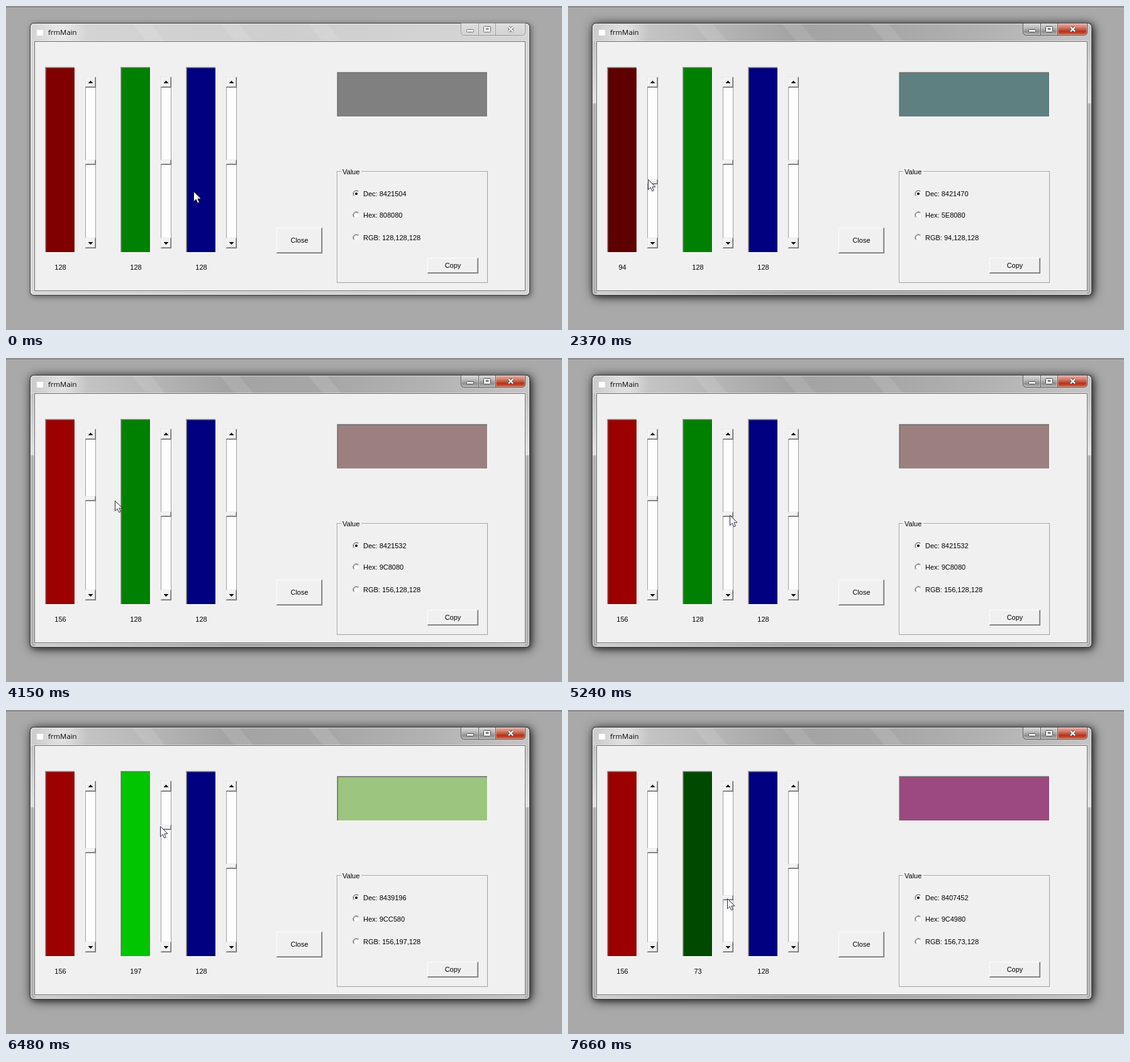
Recreate the animation shown at these times as an HTML page with a canvas. Size 884 by 516 pixels, loop 8 s.

```html
<!DOCTYPE html>
<html lang="en">
<head>
<meta charset="utf-8">
<title>Colour mixer</title>
<style>
html, body { margin: 0; width: 100%; height: 100%; overflow: hidden; background: #a9a9a9; }
canvas { display: block; }
</style>
</head>
<body>
<canvas id="stage" width="884" height="516"></canvas>
<script>
const ctx = document.getElementById('stage').getContext('2d');
const LOOP = 8000;
const STEP = 137;
const ACTIVATE = 1090;
const UI = '11px "Liberation Sans", Arial, sans-serif';
const FACE = '#f0f0f0';

// Each pose lists only what changes; the rest carries over
const poses = [
  { t: 0, x: 298, y: 295, r: 128, g: 128, b: 128 },
  { t: 140 },
  { t: 1280, x: 131, y: 247 },
  { t: 2370, x: 127, y: 276, r: 94 },
  { t: 3150, x: 133, y: 181, r: 201 },
  { t: 3450, x: 131, y: 209, r: 169 },
  { t: 3840, x: 128, y: 222, r: 156 },
  { t: 4010 },
  { t: 4560, x: 308, y: 242 },
  { t: 4970, x: 257, y: 250 },
  { t: 5100 },
  { t: 5240 },
  { t: 6480, x: 245, y: 185, g: 197 },
  { t: 7300, x: 250, y: 276, g: 96 },
  { t: 7660, x: 253, y: 300, g: 73 }
];
poses.forEach((p, i) => { poses[i] = { ...poses[i - 1], ...p }; });

// The picture refreshes in steps counted from the latest pose
function stateAt(time) {
  const i = poses.findLastIndex(p => p.t <= time);
  const a = poses[i], b = poses[i + 1] || a;
  const t = a.t + Math.floor((time - a.t) / STEP) * STEP;
  const f = b === a ? 0 : (t - a.t) / (b.t - a.t);
  const s = { active: t >= ACTIVATE };
  for (const k of 'xyrgb') s[k] = Math.round(a[k] + (b[k] - a[k]) * f);
  return s;
}

function rect(x, y, w, h, color) {
  ctx.fillStyle = color;
  ctx.fillRect(x, y, w, h);
}

function frame(x, y, w, h, light, dark) {
  rect(x, y, w, 1, light);
  rect(x, y, 1, h, light);
  rect(x, y + h - 1, w, 1, dark);
  rect(x + w - 1, y, 1, h, dark);
}

function text(str, x, y, align = 'left', font = UI) {
  ctx.font = font;
  ctx.textAlign = align;
  ctx.fillStyle = '#000';
  ctx.fillText(str, x, y);
}

function fill(color) {
  ctx.fillStyle = color;
  ctx.fill();
}

function stroke(color, width = 1) {
  ctx.lineWidth = width;
  ctx.strokeStyle = color;
  ctx.stroke();
}

function shape(points, color) {
  ctx.beginPath();
  points.forEach(([x, y]) => ctx.lineTo(x, y));
  ctx.closePath();
  fill(color);
}

function gradient(x0, y0, x1, y1, ...colors) {
  const g = ctx.createLinearGradient(x0, y0, x1, y1);
  colors.forEach((c, i) => g.addColorStop(i / (colors.length - 1), c));
  return g;
}

function round(x, y, w, h, r) {
  ctx.beginPath();
  ctx.roundRect(x, y, w, h, r);
}

function raised(x, y, w, h) {
  rect(x, y, w, h, FACE);
  frame(x, y, w, h, '#e3e3e3', '#696969');
  frame(x + 1, y + 1, w - 2, h - 2, '#fff', '#a0a0a0');
}

function sunken(x, y, w, h, color) {
  rect(x, y, w, h, color);
  frame(x, y, w, h, '#a0a0a0', '#fff');
  rect(x + 1, y + 1, w - 2, 1, '#696969');
  rect(x + 1, y + 1, 1, h - 2, '#696969');
}

function button(label, x, y, w, h) {
  rect(x, y, w, h, FACE);
  frame(x, y, w, h, '#fff', '#696969');
  frame(x + 1, y + 1, w - 2, h - 2, FACE, '#a0a0a0');
  text(label, x + w / 2, Math.floor(y + h / 2) + 4, 'center');
}

function captionButton(x, w, corners, face, edge) {
  round(x + 0.5, 27.5, w, 19, corners);
  fill(face);
  stroke(edge);
  round(x + 1.5, 28.5, w - 2, 17, corners);
  stroke('rgba(255,255,255,.4)');
}

function captionButtons(active) {
  const down = (...colors) => gradient(0, 28, 0, 47, ...colors);
  const gray = active ? down('#d6d6d6', '#bdbdbd', '#8f8f8f', '#b9b9b9') : down('#dedede', '#d2d2d2');
  const red = active ? down('#e5b0a4', '#d07b69', '#b8301a', '#d46c4c') : gray;
  const edge = active ? '#555' : '#929292';
  const ink = active ? '#4c4c4c' : '#727272';
  captionButton(723, 28, [0, 0, 0, 5], gray, edge);
  captionButton(751, 27, 0, gray, edge);
  captionButton(778, 47, [0, 0, 5, 0], red, edge);

  round(732.5, 37.5, 11, 4, 1);
  fill('#f6f6f6');
  stroke(ink);
  round(759.5, 32.5, 11, 9, 1);
  fill('#f6f6f6');
  stroke(ink);
  ctx.strokeRect(763.5, 35.5, 3, 2);
  ctx.beginPath();
  for (const d of [-3.5, 3.5]) {
    ctx.moveTo(802.5 - d, 33.5);
    ctx.lineTo(802.5 + d, 40.5);
  }
  stroke(ink, 4.4);
  stroke('#fff', 2.4);
}

function shadow(blur, alpha) {
  ctx.save();
  ctx.shadowColor = `rgba(0,0,0,${alpha})`;
  ctx.shadowBlur = blur;
  ctx.shadowOffsetX = ctx.shadowOffsetY = 2;
  round(38, 27, 795, 434, 6);
  fill('#3c3c3c');
  ctx.restore();
}

function windowFrame(active) {
  shadow(active ? 18 : 10, active ? 0.7 : 0.5);
  if (active) shadow(8, 0.45);

  ctx.save();
  round(39, 28, 793, 432, 5);
  ctx.clip();
  const tones = active ? ['#cecece', '#bbb', '#a3a3a3', '#a7a7a7', '#b2b2b2', '#c6c6c6'] : ['#d6d6d6', '#cecece', '#d6d6d6'];
  rect(39, 28, 793, 432, gradient(39, 0, 832, 0, ...tones));
  for (let x = 200; x < 500; x += 140)
    shape([[x, 28], [x + 30, 28], [x + 54, 57], [x + 24, 57]], 'rgba(255,255,255,.1)');
  for (const x of active ? [39, 825] : []) {
    rect(x, 57, 7, 98, gradient(0, 57, 0, 155, '#c2c2c2', '#e2e2e2'));
    rect(x, 155, 7, 305, '#b0b0b0');
  }
  const glow = ctx.createRadialGradient(88, 42, 8, 88, 42, 42);
  glow.addColorStop(0, 'rgba(255,255,255,.45)');
  glow.addColorStop(1, 'rgba(255,255,255,0)');
  rect(46, 29, 90, 27, glow);
  ctx.restore();

  round(39.5, 28.5, 792, 431, 5);
  stroke('rgba(255,255,255,.65)');
  rect(44, 55, 783, 400, 'rgba(255,255,255,.5)');
  rect(45, 56, 781, 398, '#686868');
  rect(46, 57, 779, 396, FACE);
  rect(49, 38, 10, 9, '#fff');
  text('frmMain', 67, 46, 'left', '11.4px "Open Sans", "Noto Sans", sans-serif');
  captionButtons(active);
}

function scrollbar(x, value) {
  rect(x, 113, 17, 273, '#fdfdfd');
  frame(x, 113, 17, 273, '#a0a0a0', '#a0a0a0');
  raised(x, 113, 17, 17);
  raised(x, 369, 17, 17);
  for (let i = 0; i < 4; i++) {
    rect(x + 8 - i, 119 + i, 1 + 2 * i, 1, '#000');
    rect(x + 8 - i, 379 - i, 1 + 2 * i, 1, '#000');
  }
  raised(x, Math.round(130 + (255 - value) / 255 * 231), 17, 8);
}

function channel(x, value, color) {
  sunken(x, 97, 48, 296, color);
  scrollbar(x + 64, value);
  text(value, x + 24.5, 420, 'center');
}

function arc(x, y, r, from, color) {
  ctx.beginPath();
  ctx.arc(x, y, r, from, from + Math.PI);
  stroke(color);
}

function disc(x, y, r, color) {
  ctx.beginPath();
  ctx.arc(x, y, r, 0, Math.PI * 2);
  fill(color);
}

function radio(label, y, checked) {
  const x = 557, lit = -Math.PI / 4, dim = Math.PI * 0.75;
  disc(x, y, 5, '#fff');
  arc(x, y, 5.4, dim, '#a0a0a0');
  arc(x, y, 4.5, dim, '#696969');
  arc(x, y, 5.4, lit, '#fff');
  arc(x, y, 4.5, lit, '#e3e3e3');
  if (checked) disc(x, y, 2.1, '#000');
  text(label, 568, y + 4);
}

function valueGroup({ r, g, b }) {
  ctx.lineWidth = 1;
  ctx.strokeStyle = '#fff';
  ctx.strokeRect(527.5, 264.5, 238, 176);
  ctx.strokeStyle = '#a0a0a0';
  ctx.strokeRect(526.5, 263.5, 239, 177);
  rect(533, 262, 32, 4, FACE);
  text('Value', 535, 268);
  const hex = [r, g, b].map(v => v.toString(16).padStart(2, '0')).join('').toUpperCase();
  radio('Dec: ' + (r + g * 256 + b * 65536), 299, true);
  radio('Hex: ' + hex, 333);
  radio(`RGB: ${r},${g},${b}`, 369);
  button('Copy', 670, 401, 81, 25);
}

function cursor(x, y) {
  ctx.save();
  ctx.translate(x + 0.5, y + 0.5);
  shape([[0, 0], [0, 16], [3.7, 12.6], [6.2, 18.3], [8.8, 17.2], [6.4, 11.6], [11.5, 11.5]], '#fff');
  stroke('#26263a');
  ctx.restore();
}

function draw(time) {
  const { x, y, r, g, b, active } = stateAt(time);
  rect(0, 0, 884, 516, '#a9a9a9');
  rect(0, 1, 884, 1, '#6c6c6c');
  windowFrame(active);
  channel(62, r, `rgb(${r},0,0)`);
  channel(182, g, `rgb(0,${g},0)`);
  channel(286, b, `rgb(0,0,${b})`);
  sunken(526, 105, 240, 72, `rgb(${r},${g},${b})`);
  button('Close', 430, 353, 73, 41);
  valueGroup({ r, g, b });
  cursor(x, y);
}

const start = performance.now();
function tick() {
  draw((performance.now() - start) % LOOP);
  requestAnimationFrame(tick);
}
tick();
</script>
</body>
</html>
```
